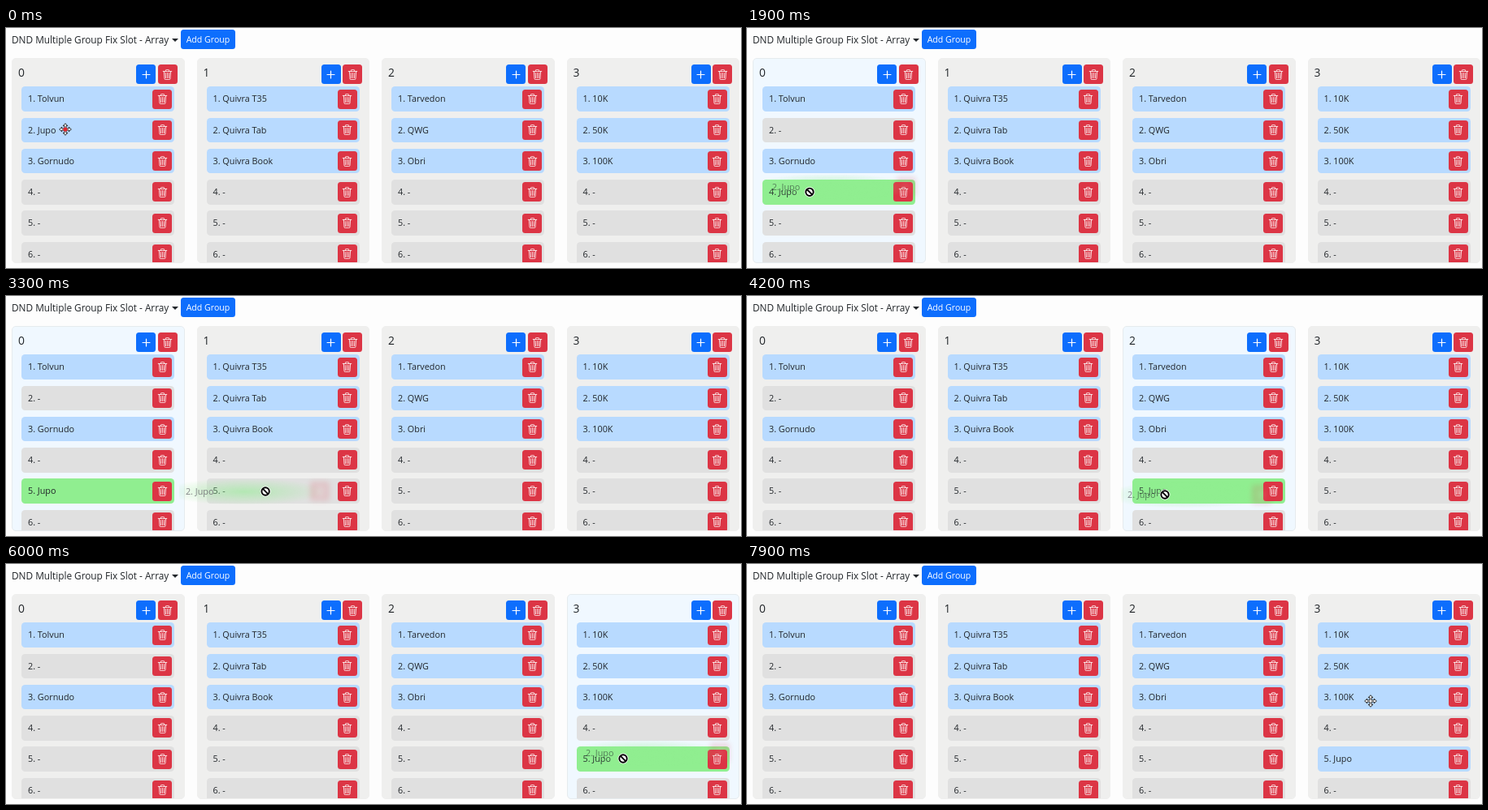
An HTML page for the animation above (8000 ms loop, 904x296 px).

```html
<!DOCTYPE html>
<html lang="en">
<head>
<meta charset="utf-8">
<title>Drag and drop groups</title>
<style>
  html, body { margin: 0; width: 100%; height: 100%; overflow: hidden; background: #fdfdfd; }
  body { position: relative; color: #212529; font: 10.8px/30.5px "Open Sans", "Noto Sans", sans-serif; white-space: pre; }
  .title, .caret, .group, .row, .btn, .name, #cursor { position: absolute; box-sizing: border-box; }
  .title { left: 7px; top: 0; font-size: 11.8px; line-height: 29px; }
  .caret { left: 204px; top: 12.5px; border: 4px solid transparent; border-top-color: #212529; border-bottom: 0; }
  .group { top: 37px; width: 212.5px; height: 253px; overflow: hidden; border-radius: 5px; background: #efefee; border: 1px solid #efefee; }
  .group.over { background: #f0f8ff; border-color: #e6ebee; }
  .name { left: 7px; top: 2px; font-size: 13.8px; }
  .row { left: 11px; width: 188px; height: 30.6px; padding-left: 8px; border-radius: 4.5px; background: #e0e0e0; }
  .row.filled { background: #b8daff; }
  .row.dragged { background: #90ee90; }
  .btn { width: 24px; height: 24px; border-radius: 3.5px; background: #dc3545; color: #fff; }
  .btn svg { position: absolute; left: 5.5px; top: 5.5px; width: 13px; height: 13px; }
  .btn.add { background: #0d6efd; }
  .btn.wide { left: 215px; top: 2px; width: 67px; font-size: 10.6px; line-height: 24px; text-align: center; }
  .row .btn { left: 161px; top: 3.3px; }
  #ghost { left: 0; top: 0; opacity: .55; background: radial-gradient(ellipse 100px 17px at 80px 50%, #90ee90, #90ee9000); }
  #ghost .btn { opacity: .3; filter: blur(3px); }
  #cursor { left: -8px; top: -8px; width: 16px; height: 16px; overflow: visible; }
</style>
</head>
<body>
<div class="title">DND Multiple Group Fix Slot - Array</div>
<div class="caret"></div>
<div class="btn add wide">Add Group</div>
<div id="groups"></div>
<div id="ghost" class="row"></div>
<svg id="cursor" viewBox="-8 -8 16 16">
  <g id="move">
    <path d="M0-7.3 2.8-4.3H1V-1H4.3V-2.8L7.3 0 4.3 2.8V1H1V4.3H2.8L0 7.3-2.8 4.3H-1V1H-4.3V2.8L-7.3 0-4.3-2.8V-1H-1V-4.3H-2.8Z" fill="#fff" stroke="#111" stroke-width=".9"/>
    <circle id="press" r="2.6" fill="#e0262e"/>
  </g>
  <g id="blocked" fill="none">
    <circle r="4.7" fill="#fff" stroke="#fff" stroke-width="3.4"/>
    <path d="M-3.3-3.3 3.3 3.3" stroke="#000" stroke-width="1.9"/>
    <circle r="4.7" stroke="#000" stroke-width="1.9"/>
  </g>
</svg>
<script>
const LOOP = 8000, STEP = 100, GRAB = 700, DROP = 6300;
const SLOTS = 6, GROUP_PITCH = 227.5, ROW_PITCH = 38.25;
const item = "Jupo", home = { group: 0, slot: 1 };
const groups = [
  ["Tolvun", null, "Gornudo"],
  ["Quivra T35", "Quivra Tab", "Quivra Book"],
  ["Tarvedon", "QWG", "Obri"],
  ["10K", "50K", "100K"]
];

// The pointer rests at each stop from arrive to leave.
const stops = [
  { arrive: 0, leave: GRAB, x: 73, y: 125 },
  { arrive: 2500, leave: 2840, x: 79, y: 241 },
  { arrive: 3340, leave: 3800, x: 340, y: 241 },
  { arrive: 4000, leave: 4800, x: 514, y: 245 },
  { arrive: 5900, leave: 5900, x: 759, y: 233 },
  { arrive: 6000, leave: 6700, x: 759, y: 240 },
  { arrive: 7900, leave: LOOP, x: 767, y: 169 }
];

const $ = id => document.getElementById(id);
const icon = (d, width) =>
  `<svg viewBox="0 0 16 16" fill="none" stroke="#fff" stroke-width="${width}" stroke-linecap="round" stroke-linejoin="round"><path d="${d}"/></svg>`;
const plus = icon("M8 2.5V13.5M2.5 8H13.5", 1.5);
const trash = icon("M1.5 3H14.5M5.5 3V1.5Q5.5.5 6.5.5H9.5Q10.5.5 10.5 1.5V3M2.9 3 3.7 14Q3.8 15.5 5.2 15.5H10.8Q12.2 15.5 12.3 14L13.1 3M5.3 5.5 5.6 13M8 5.5V13M10.7 5.5 10.4 13", 1);

function add(parent, className, html, style = {}) {
  const el = document.createElement("div");
  el.className = className;
  el.innerHTML = html;
  Object.assign(el.style, style);
  return parent.appendChild(el);
}

function makeRow(el) {
  const label = add(el, "", "");
  add(el, "btn", trash);
  return { el, label };
}

const views = groups.map((_, g) => {
  const el = add($("groups"), "group", "", { left: 7 + g * GROUP_PITCH + "px" });
  add(el, "name", g);
  add(el, "btn add", plus, { left: "152px", top: "7px" });
  add(el, "btn", trash, { left: "178.5px", top: "7px" });
  const rows = Array.from({ length: SLOTS }, (_, s) =>
    makeRow(add(el, "row", "", { top: 34.3 + s * ROW_PITCH + "px" })));
  return { el, rows };
});
makeRow($("ghost")).label.textContent = "2. " + item;

function cursorAt(t) {
  const to = stops.find(s => t <= s.leave);
  const from = stops[stops.indexOf(to) - 1];
  if (!from || t >= to.arrive) return [to.x, to.y];
  const k = (t - from.leave) / (to.arrive - from.leave);
  return [from.x + (to.x - from.x) * k, from.y + (to.y - from.y) * k];
}

// The item sits in the last empty slot the pointer has entered; the page reacts a little late.
function placeAt(t) {
  let place = home;
  for (let time = GRAB; time <= Math.min(t, DROP); time += STEP) {
    const [x, y] = cursorAt(time - 1.5 * STEP);
    const group = Math.floor((x - 19) / GROUP_PITCH);
    const slot = Math.floor((y - 68) / ROW_PITCH);
    if (!groups[group][slot]) place = { group, slot };
  }
  return place;
}

groups[home.group][home.slot] = item;
const moveTo = (el, x, y) => el.style.transform = `translate(${x}px, ${y}px)`;
const show = (el, visible) => el.style.display = visible ? "" : "none";

function render(t) {
  const dragging = t >= GRAB && t < DROP;
  const place = placeAt(t);

  views.forEach(({ el, rows }, g) => {
    el.classList.toggle("over", dragging && place !== home && g === place.group);
    rows.forEach((row, s) => {
      const held = g === place.group && s === place.slot;
      const own = groups[g][s];
      const text = held ? item : own === item ? null : own;
      row.label.textContent = `${s + 1}. ${text || "-"}`;
      row.el.className = "row" + (held && dragging ? " dragged" : text ? " filled" : "");
    });
  });

  const [x, y] = cursorAt(t);
  moveTo($("cursor"), x, y);
  show($("move"), !dragging);
  show($("press"), t < 300);
  show($("blocked"), dragging);

  // The drag image trails the pointer by one step.
  const [gx, gy] = cursorAt(t - STEP);
  moveTo($("ghost"), gx - 54, gy - 15.2);
  show($("ghost"), dragging);
}

function tick() {
  const t = performance.now() % LOOP;
  render(Math.floor(t / STEP) * STEP);
  requestAnimationFrame(tick);
}
tick();
</script>
</body>
</html>
```
